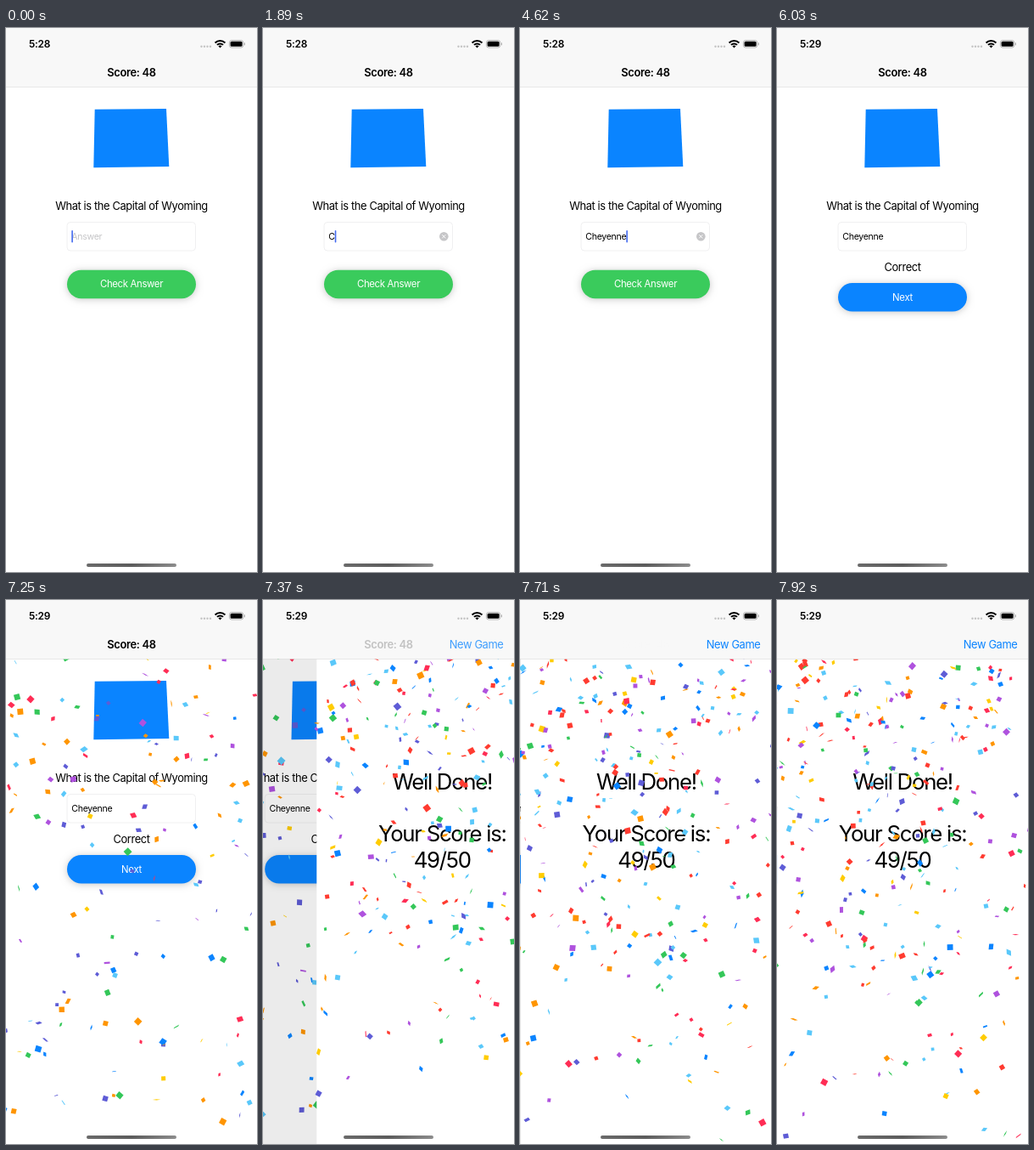
Recreate the animation shown at these times as an HTML page with a canvas. Size 296 by 640 pixels, loop 8 s.

```html
<!DOCTYPE html>
<html lang="en">
<head>
<meta charset="utf-8">
<title>Capitals quiz</title>
<style>
html, body { margin: 0; width: 100%; height: 100%; overflow: hidden; background: #fff; }
canvas { display: block; width: 296px; height: 640px; }
</style>
</head>
<body>
<canvas id="stage"></canvas>
<script>
const W = 296, H = 640, LOOP = 8000;
const BLUE = '#0a84ff', GREEN = '#3acb5c';
const canvas = document.getElementById('stage');
const ctx = canvas.getContext('2d');
const dpr = window.devicePixelRatio || 1;
canvas.width = W * dpr;
canvas.height = H * dpr;

// Each row: start time, value held until the next row
const TYPED = [[0, ''], [1890, 'C'], [2940, 'Ch'], [3050, 'Che'], [3230, 'Chey'],
  [3590, 'Cheye'], [4430, 'Cheyenn'], [4620, 'Cheyenne']];
const CARET = [[0, 1], [550, .65], [660, .3], [780, 0], [1210, 1], [1450, .4], [1570, 0],
  [1890, 1], [4210, 0], [4430, 1], [5280, 0], [5490, .5], [5610, 1], [6030, 0]];
const TICKS = [0, 7250, 7370, 7480, 7590, 7710, 7810, 7920].map(t => [t, t]);
const at = (rows, t) => rows.findLast(row => row[0] <= t)[1];

function random(seed) {
  return () => {
    seed = seed + 0x6D2B79F5 | 0;
    let v = Math.imul(seed ^ seed >>> 15, 1 | seed);
    v = v + Math.imul(v ^ v >>> 7, 61 | v) ^ v;
    return ((v ^ v >>> 14) >>> 0) / 4294967296;
  };
}

function makeConfetti(count, seed, colors, spread) {
  const r = random(seed);
  return Array.from({ length: count }, () => ({
    x: r() * W, y: 25 + 610 * spread(r()),
    vx: (r() - .5) * 50, vy: 65 + r() * 55,
    size: 3.5 + r() * 3.6, color: colors[Math.floor(r() * colors.length)],
    angle: r() * 6.28, turn: (r() - .5) * 6,
    tilt: r() * 6.28, flip: 3 + r() * 6, corner: r() * 1.57
  }));
}

const INDIGO = '#5e5cd6', PURPLE = '#af52de', TEAL = '#5ac8fa', RED = '#ff3b30',
  PINK = '#ff2d55', ORANGE = '#ff9500', YELLOW = '#ffcc00', LEAF = '#34c759';
const quizConfetti = makeConfetti(180, 11,
  [INDIGO, INDIGO, PURPLE, BLUE, TEAL, PINK, ORANGE, ORANGE, YELLOW, LEAF], u => u ** 1.4);
const scoreConfetti = makeConfetti(310, 29,
  [RED, RED, PINK, BLUE, TEAL, TEAL, LEAF, ORANGE, YELLOW, INDIGO, PURPLE], u => 1 - Math.sqrt(u));

function drawConfetti(pieces, t) {
  const s = (t - 7480) / 1000;
  for (const p of pieces) {
    ctx.save();
    ctx.translate(p.x + p.vx * s, p.y + p.vy * s);
    ctx.rotate(p.angle + p.turn * s);
    ctx.scale(1, Math.max(.15, Math.abs(Math.cos(p.tilt + p.flip * s))));
    ctx.rotate(p.corner);
    ctx.fillStyle = p.color;
    ctx.fillRect(-p.size / 2, -p.size / 2, p.size, p.size);
    ctx.restore();
  }
}

function text(s, x, y, size, { color = '#000', align = 'center', weight = 400, track = -.03 } = {}) {
  ctx.font = `${weight} ${size}px Inter, "Liberation Sans", sans-serif`;
  ctx.letterSpacing = `${track * size}px`;
  ctx.textAlign = align;
  ctx.fillStyle = color;
  ctx.fillText(s, x, y);
  return ctx.measureText(s).width;
}

function box(x, y, w, h, radius, color) {
  ctx.beginPath();
  ctx.roundRect(x, y, w, h, radius);
  ctx.fillStyle = color;
  ctx.fill();
}

function poly(points, color) {
  ctx.beginPath();
  points.forEach(p => ctx.lineTo(...p));
  ctx.closePath();
  ctx.fillStyle = color;
  ctx.fill();
}

function stroke(color, width) {
  ctx.strokeStyle = color;
  ctx.lineWidth = width;
  ctx.stroke();
}

function button(label, y, color) {
  ctx.save();
  ctx.shadowColor = 'rgba(0,0,0,.22)';
  ctx.shadowBlur = 9 * dpr;
  ctx.shadowOffsetY = dpr;
  box(72, y, 152, 33.5, 16.75, color);
  ctx.restore();
  text(label, 148, y + 20.5, 11.4, { color: '#fff' });
}

function clearIcon() {
  box(208, 240, 10.6, 10.6, 5.3, '#c6c6c8');
  ctx.beginPath();
  for (const d of [-1, 1]) {
    ctx.moveTo(213.3 - 2, 245.3 - 2 * d);
    ctx.lineTo(213.3 + 2, 245.3 + 2 * d);
  }
  stroke('#fff', 1);
}

function quizView(t) {
  const answered = t >= 6030, typed = at(TYPED, t);
  poly([[104.7, 95.7], [189, 95], [192.3, 163], [103.3, 164.2]], BLUE);
  text('What is the Capital of Wyoming', 148, 214, 12.9);

  ctx.beginPath();
  ctx.roundRect(72, 228.5, 151.5, 33.5, 4);
  stroke('#f0f0f1', 1);
  const width = typed
    ? text(typed, 77.3, 249, 10.6, { align: 'left' })
    : text('Answer', 77.3, 249, 10.6, { align: 'left', color: '#c5c5c7' }) * 0;
  ctx.globalAlpha = at(CARET, t);
  box(77.3 + width, 238, 1.6, 14.5, .8, '#4169f0');
  ctx.globalAlpha = 1;

  if (answered) {
    text('Correct', 148, 285.5, 12.9);
    button('Next', 300, BLUE);
  } else {
    if (typed) clearIcon();
    button('Check Answer', 284.7, GREEN);
  }
}

function scoreView() {
  ctx.fillStyle = '#fff';
  ctx.fillRect(0, 0, W, H);
  const big = { track: -.05 };
  text('Well Done!', 148, 222.5, 25.8, big);
  text('Your Score is:', 148, 284, 25.8, big);
  text('49/50', 148, 315, 25.8, big);
}

function statusBar(t) {
  text(t < 5280 ? '5:28' : '5:29', 27, 23, 11.9, { align: 'left', weight: 600, track: -.02 });
  for (let i = 0; i < 4; i++) box(229.3 + i * 3.5, 20.6, 2.4, 2.4, 1.2, '#c4c4c4');
  for (const r of [1.5, 5, 8.4]) {
    ctx.beginPath();
    ctx.arc(252.5, 23.4, r, -Math.PI * .75, -Math.PI * .25);
    stroke('#000', r < 2 ? 3 : 2);
  }
  ctx.beginPath();
  ctx.roundRect(263.4, 14.6, 16.4, 8.4, 2.6);
  stroke('#a4a4a4', .8);
  box(264.6, 15.8, 14, 6, 1.5, '#000');
  box(280.8, 17.3, 1, 3, .5, '#a4a4a4');
}

function draw(t) {
  const tick = at(TICKS, t);
  // Distance the score view still has to slide in
  const gap = tick < 7370 ? W : 16 * Math.exp((7480 - tick) / 80);
  const done = 1 - gap / W;

  ctx.setTransform(dpr, 0, 0, dpr, 0, 0);
  ctx.fillStyle = '#fff';
  ctx.fillRect(0, 0, W, H);

  ctx.save();
  ctx.translate(-.3 * W * done, 0);
  quizView(t);
  if (tick) drawConfetti(quizConfetti, tick);
  ctx.restore();

  if (done > 0) {
    ctx.fillStyle = `rgba(0,0,0,${.1 * done})`;
    ctx.fillRect(0, 0, W, H);
    ctx.save();
    ctx.translate(gap, 0);
    scoreView();
    drawConfetti(scoreConfetti, tick);
    ctx.restore();
  }

  ctx.fillStyle = '#f8f8f8';
  ctx.fillRect(0, 0, W, 69);
  ctx.fillStyle = '#dedede';
  ctx.fillRect(0, 69, W, .7);
  ctx.globalAlpha = 1 - done;
  text('Score: 48', 148, 57, 12.9, { weight: 600, track: -.025 });
  ctx.globalAlpha = done;
  text('New Game', 283.5, 57, 12.9, { align: 'right', color: BLUE });
  ctx.globalAlpha = 1;
  statusBar(t);

  const bar = ctx.createLinearGradient(95, 0, 201, 0);
  bar.addColorStop(0, '#6a6a6a');
  bar.addColorStop(.5, '#5c5c5c');
  bar.addColorStop(1, '#8c8c8c');
  box(95, 630, 106, 4, 2, bar);
}

const start = performance.now();
function frame() {
  draw((performance.now() - start) % LOOP);
  requestAnimationFrame(frame);
}
frame();
</script>
</body>
</html>
```
